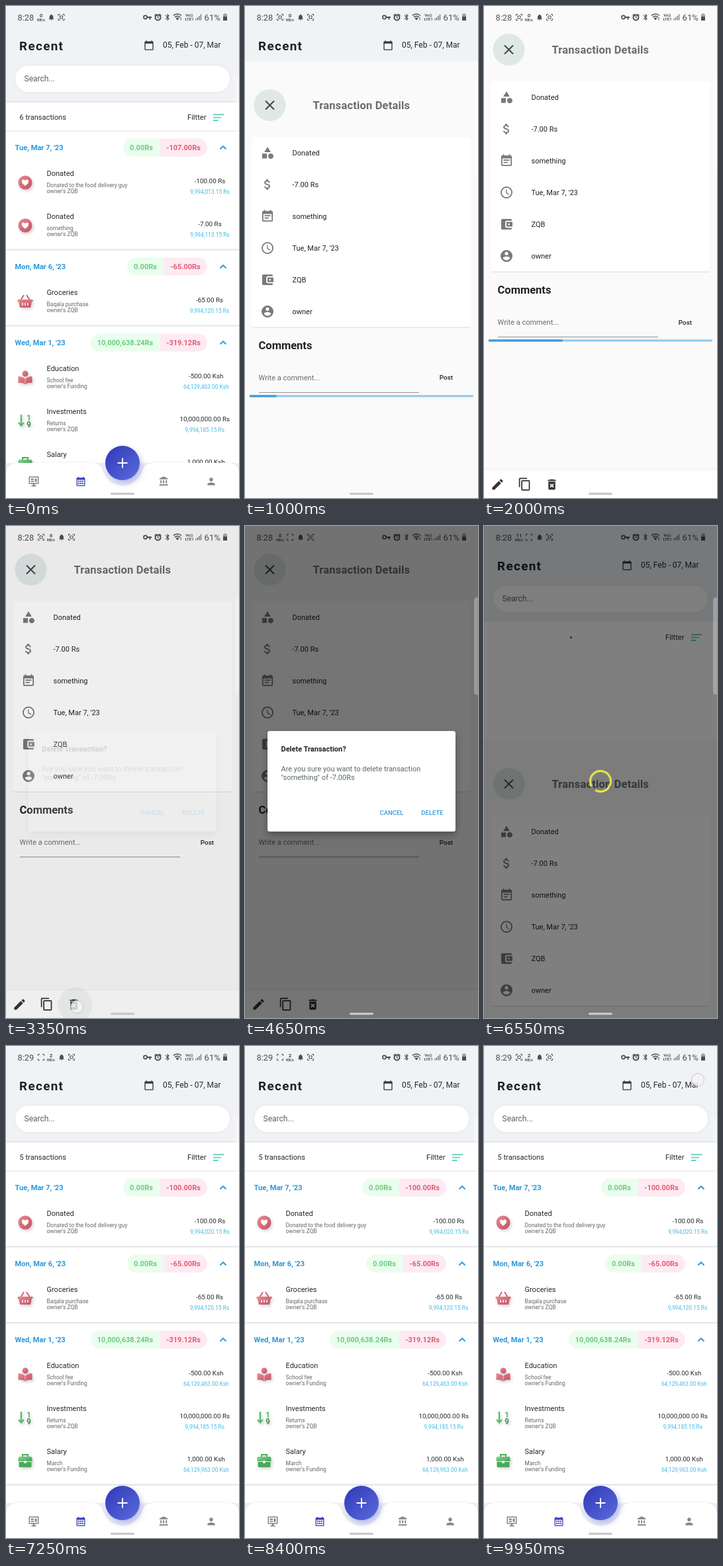
An HTML page that plays this animation: 352x744 px, repeating every 10 s.

```html
<!DOCTYPE html>
<html lang="en">
<head>
<meta charset="utf-8">
<title>Transactions</title>
<style>
html, body { margin: 0; width: 100%; height: 100%; overflow: hidden; background: #f0f2f5; }
svg { display: block; width: 100%; height: 100%; }
text { font-family: Roboto, Arial, sans-serif; white-space: pre; }
</style>
</head>
<body>
<svg id="stage" viewBox="0 0 352 744" xmlns="http://www.w3.org/2000/svg"></svg>
<script>
const LOOP = 10000;
const BLUE = '#2f97d6', INK = '#26282c', GREY = '#7a7a7a';

// Icon outlines on a 24 unit grid
const ICONS = {
  shapes: 'M12 2l-5.5 9h11zM3 13.5h8v8H3zM17.5 13a4.5 4.5 0 1 0 .01 0z',
  money: 'M11.8 10.9c-2.27-.59-3-1.2-3-2.15 0-1.09 1.01-1.85 2.7-1.85 1.78 0 2.44.85 2.5 2.1h2.21c-.07-1.72-1.12-3.3-3.21-3.81V3h-3v2.16c-1.94.42-3.5 1.68-3.5 3.61 0 2.31 1.91 3.46 4.7 4.13 2.5.6 3 1.48 3 2.41 0 .69-.49 1.79-2.7 1.79-2.06 0-2.87-.92-2.98-2.1h-2.2c.12 2.19 1.76 3.42 3.68 3.83V21h3v-2.15c1.95-.37 3.5-1.5 3.5-3.55 0-2.84-2.43-3.81-4.7-4.4z',
  note: 'M17 10H7v2h10zM19 3h-1V1h-2v2H8V1H6v2H5a2 2 0 0 0-2 2v14a2 2 0 0 0 2 2h14a2 2 0 0 0 2-2V5a2 2 0 0 0-2-2zm0 16H5V8h14zm-5-5H7v2h7z',
  clock: 'M12 2a10 10 0 1 0 .01 0zM12 20a8 8 0 1 1 .01 0zM12.5 7H11v6l5.25 3.15.75-1.23-4.5-2.67z',
  wallet: 'M21 18v1a2 2 0 0 1-2 2H5a2 2 0 0 1-2-2V5a2 2 0 0 1 2-2h14a2 2 0 0 1 2 2v1h-9a2 2 0 0 0-2 2v8a2 2 0 0 0 2 2zm-9-2h10V8H12zm4-2.5a1.5 1.5 0 1 1 .01 0z',
  account: 'M12 2a10 10 0 1 0 .01 0zM12 5a3 3 0 1 1-.01 0zM12 19.2c-2.5 0-4.71-1.28-6-3.22.03-1.99 4-3.08 6-3.08 1.99 0 5.97 1.09 6 3.08-1.29 1.94-3.5 3.22-6 3.22z',
  edit: 'M3 17.25V21h3.75L17.81 9.94l-3.75-3.75zM20.71 7.04a1 1 0 0 0 0-1.41l-2.34-2.34a1 1 0 0 0-1.41 0l-1.83 1.83 3.75 3.75z',
  copy: 'M16 1H4a2 2 0 0 0-2 2v14h2V3h12zM19 5H8a2 2 0 0 0-2 2v14a2 2 0 0 0 2 2h11a2 2 0 0 0 2-2V7a2 2 0 0 0-2-2zm0 16H8V7h11z',
  trash: 'M6 19a2 2 0 0 0 2 2h8a2 2 0 0 0 2-2V7H6zm2.46-7.12l1.41-1.41L12 12.59l2.12-2.12 1.41 1.41L13.41 14l2.12 2.12-1.41 1.41L12 15.41l-2.12 2.12-1.41-1.41L10.59 14zM15.5 4l-1-1h-5l-1 1H5v2h14V4z',
  bank: 'M4 10v7h3v-7zM10 10v7h3v-7zM2 22h19v-3H2zM16 10v7h3v-7zM11.5 1L2 6v2h19V6z',
  person: 'M12 4a4 4 0 1 0 .01 0zM12 14c-2.67 0-8 1.34-8 4v2h16v-2c0-2.66-5.33-4-8-4z',
  calendar: 'M20 3h-1V1h-2v2H7V1H5v2H4a2 2 0 0 0-2 2v16a2 2 0 0 0 2 2h16a2 2 0 0 0 2-2V5a2 2 0 0 0-2-2zm0 18H4V8h16z',
  month: 'M20 3h-1V1h-2v2H7V1H5v2H4a2 2 0 0 0-2 2v16a2 2 0 0 0 2 2h16a2 2 0 0 0 2-2V5a2 2 0 0 0-2-2zm0 18H4V8h16zM6 10h3v3H6zM10.5 10h3v3h-3zM15 10h3v3h-3zM6 15h3v3H6zM10.5 15h3v3h-3zM15 15h3v3h-3z',
  monitor: 'M2 2h20v15H2zM4 4v11h16V4zM6 6h6v3H6zM6 10.5h6V13H6zM14 6h4v7h-4zM10 17h4v3h3v2H7v-2h3z',
  bell: 'M12 22a2 2 0 0 0 2-2h-4a2 2 0 0 0 2 2zM18 16v-5c0-3.07-1.64-5.64-4.5-6.32V4a1.5 1.5 0 0 0-3 0v.68C7.63 5.36 6 7.92 6 11v5l-2 2v1h16v-1z',
  bluetooth: 'M17.71 7.71L12 2h-1v7.59L6.41 5 5 6.41 10.59 12 5 17.59 6.41 19 11 14.41V22h1l5.71-5.71-4.3-4.29zM13 5.83l1.88 1.88L13 9.59zM14.88 16.29L13 18.17v-3.76z',
  heart: 'M12 21C5 15 2 12 2 8a5 5 0 0 1 10-2 5 5 0 0 1 10 2c0 4-3 7-10 13z'
};

const attrs = o => Object.entries(o).map(([k, v]) => `${k}="${v}"`).join(' ');
const group = (body, o = {}) => `<g ${attrs(o)}>${body}</g>`;
const rect = (x, y, width, height, fill, o = {}) => `<rect ${attrs({ x, y, width, height, fill, ...o })}/>`;
const circle = (cx, cy, r, fill, o = {}) => `<circle ${attrs({ cx, cy, r, fill, ...o })}/>`;
const path = (d, fill, o = {}) => `<path ${attrs({ d, fill, ...o })}/>`;
const line = (d, stroke, w = 1, o = {}) => path(d, 'none', { stroke, 'stroke-width': w, ...o });
const icon = (name, cx, cy, size, fill) => path(ICONS[name], fill, {
  'fill-rule': 'evenodd', transform: `translate(${cx - size / 2} ${cy - size / 2}) scale(${size / 24})` });
// y is the middle of the capitals
const text = (x, y, str, size, fill = INK, weight = 400, o = {}) =>
  `<text ${attrs({ x, y: y + size * .355, 'font-size': size, fill, 'font-weight': weight, ...o })}>${str}</text>`;
const mid = (x, y, str, size, fill, weight, o = {}) => text(x, y, str, size, fill, weight, { 'text-anchor': 'middle', ...o });

const ART = {
  Donated: circle(0, 0, 10.5, 'url(#red)') + icon('heart', 0, .5, 12, '#fff'),
  Groceries: line('M-7 -2L-2 -10M7 -2L2 -10', '#c9606c', 1.8) +
    path('M-11.5 -3H11.5V0H10L8 9H-8L-10 0H-11.5Z', 'url(#red)') + line('M-4 2V6M0 2V6M4 2V6', '#fff', 1.4),
  Education: circle(0, -6, 4.5, 'url(#red)') +
    path('M-10.5 -2Q-4 -2 0 2Q4 -2 10.5 -2V8Q4 7 0 10Q-4 7 -10.5 8Z', 'url(#red)') + line('M0 2V9', '#f3bcc2', 1),
  Investments: line('M-6 -9V7M-10 3L-6 7.5L-2 3', '#58bd68', 2.4) +
    mid(5.5, -4.5, '1', 12, '#58bd68', 700) + mid(5.5, 5.5, '9', 12, '#468b50', 700),
  Salary: line('M-4 -6V-9H4V-6', '#4fae5e', 2) + rect(-10.5, -6, 21, 8, 'url(#green)', { rx: 2 }) +
    rect(-9.5, 1, 19, 9, '#4aa95a', { rx: 1.5 }) + line('M-10 1.5H10', '#e2f5e4', 1) + rect(-2, 0, 4, 4, '#e2f5e4', { rx: 1 })
};

function entry(top, [title, note, account, amount, balance, cx]) {
  return group(ART[title], { transform: `translate(29 ${top + 27})`, filter: 'url(#soft)' }) +
    text(61.5, top + 13, title, 11) +
    text(61.5, top + 31, note, 8.5, '#65686d') + text(61.5, top + 40, account, 8.5, '#65686d') +
    mid(cx, top + 24, amount, 9.9, INK) + mid(cx, top + 41.5, balance, 8.4, '#45bce8');
}

function section(top, { day, income, spent, left, split, rows }) {
  const mark = top + 24, end = top + 50 + rows.length * 65;
  return path(`M${split} ${mark - 13.5}H${left + 13.5}a13.5 13.5 0 0 0 0 27H${split}Z`, '#eafdee') +
    path(`M${split} ${mark - 13.5}H290.5a13.5 13.5 0 0 1 0 27H${split}Z`, '#feeaf2') +
    text(13.5, mark, day, 11.1, BLUE, 700) +
    mid((left + split) / 2 - .5, mark, income, 11, '#69cd7c', 700) +
    mid((split + 304) / 2 - .5, mark, spent, 11, '#e35d72', 700) +
    line(`M323.5 ${mark + 2.5}L328 ${mark - 2}L332.5 ${mark + 2.5}`, BLUE, 1.9) +
    rows.map((r, i) => entry(top + 50 + i * 65, r)).join('') +
    rect(0, end - 2.5, 352, 2, '#e2e4e8');
}

const BANK = "owner's ZQB", FUND = "owner's Funding";
const later = [
  { day: "Mon, Mar 6, '23", income: '0.00Rs', spent: '-65.00Rs', left: 183, split: 239, rows: [
    ['Groceries', 'Baqala purchase', BANK, '-65.00 Rs', '9,994,120.15 Rs', 307.5]] },
  { day: "Wed, Mar 1, '23", income: '10,000,638.24Rs', spent: '-319.12Rs', left: 128, split: 233, rows: [
    ['Education', 'School fee', FUND, '-500.00 Ksh', '64,129,463.00 Ksh', 302.3],
    ['Investments', 'Returns', BANK, '10,000,000.00 Rs', '9,994,185.15 Rs', 300.3],
    ['Salary', 'March', FUND, '1,000.00 Ksh', '64,129,963.00 Ksh', 302.3]] }
];
const today = (spent, rows) => ({ day: "Tue, Mar 7, '23", income: '0.00Rs', spent, left: 177, split: 233, rows });
const gift = balance => ['Donated', 'Donated to the food delivery guy', BANK, '-100.00 Rs', balance, 308];

function list(id, count, sections) {
  let top = 190;
  let body = text(20.5, 168.5, `${count} transactions`, 11.1) +
    rect(0, 144, 352, 2, '#e5e7eb') + rect(0, 188.5, 352, 1.2, '#e4e6e9');
  for (const s of sections) {
    body += section(top, s);
    top += 50 + s.rows.length * 65;
  }
  return group(body, { id });
}

const home = rect(0, 0, 352, 744, '#fff') + rect(0, 0, 352, 145, '#f0f2f5') +
  text(20, 60, 'Recent', 18.8, '#1d2024', 700, { 'letter-spacing': 1.4 }) +
  icon('calendar', 216, 59.5, 16, '#34363a') + text(237, 59, '05, Feb - 07, Mar', 12, INK) +
  rect(14, 90, 324, 40, '#fff', { rx: 20, filter: 'url(#faint)' }) + text(27.5, 110, 'Search...', 12, '#5f6165') +
  text(274, 168.5, 'Filtter', 11.1) +
  line('M313 164.2H329.5M313 168.6H325M313 173H320.5', '#68cfbc', 1.9) +
  list('before', 6, [today('-107.00Rs', [gift('9,994,013.15 Rs'),
    ['Donated', 'something', BANK, '-7.00 Rs', '9,994,113.15 Rs', 308]]), ...later]) +
  list('after', 5, [today('-100.00Rs', [gift('9,994,020.15 Rs')]), ...later]) +
  circle(131.5, 168.5, 1.8, '#6b7b8c', { id: 'dot' }) +
  rect(0, 691, 352, 53, '#f0f1f5') +
  path('M0 744V709Q0 691 18 691H128Q143 691 146 702A31 31 0 0 0 206 702Q209 691 224 691H334Q352 691 352 709V744Z', '#fff', { filter: 'url(#faint)' }) +
  circle(176, 691, 26, 'url(#fab)', { filter: 'url(#glow)' }) + line('M168.5 691H183.5M176 683.5V698.5', '#fff', 2) +
  icon('monitor', 42, 719, 18, '#85878c') + icon('month', 113, 719, 15.5, '#3440b8') +
  icon('bank', 238.5, 718.5, 16, '#85878c') + icon('person', 310, 719, 17, '#85878c');

const facts = [['shapes', 'Donated'], ['money', '-7.00 Rs'], ['note', 'something'],
  ['clock', "Tue, Mar 7, '23"], ['wallet', 'ZQB'], ['account', 'owner']];

const sheet = rect(0, 0, 352, 744, '#fafafa') +
  circle(37.5, 66, 24, '#dfe8e6') + line('M31 59.5L44 72.5M44 59.5L31 72.5', '#444', 2) +
  text(102.5, 66, 'Transaction Details', 16.5, '#6c6c6c', 700, { 'letter-spacing': .17 }) +
  rect(11, 114, 330, 287.5, '#fff', { rx: 3, filter: 'url(#card)' }) +
  facts.map(([name, label], i) => icon(name, 34, 138 + 48 * i, 21.5, GREY) +
    text(71.5, 138 + 48 * i, label, 11, '#222')).join('') +
  text(20.5, 429, 'Comments', 16.5, '#202226', 700) +
  text(20.5, 478, 'Write a comment...', 11, '#6a6a6a') + line('M21 500.5H263', '#929292', 1) +
  mid(304, 478, 'Post', 9.9, '#222', 500) +
  group(rect(7, 504.3, 338, 3.2, '#94caf2') + rect(7, 504.3, 0, 3.2, '#4799d8', { id: 'run1' }) +
    rect(7, 504.3, 0, 3.2, '#4799d8', { id: 'run2' }), { id: 'bar' }) +
  rect(0, 702, 352, 42, '#fff', { filter: 'url(#faint)' }) +
  circle(104.5, 724, 26, '#244', { id: 'ripple' }) +
  icon('edit', 20.5, 723.5, 21.5, '#333') + icon('copy', 61.5, 723, 21, '#333') + icon('trash', 102.5, 723.5, 21, '#333');

const dialog = rect(34, 310, 284, 152, '#fff', { rx: 3.5, filter: 'url(#lift)' }) +
  text(54.5, 337, 'Delete Transaction?', 11, '#222', 700) +
  text(54.5, 367.5, 'Are you sure you want to delete transaction', 11, '#5d6667') +
  text(54.5, 380, '"something" of -7.00Rs', 11, '#5d6667') +
  mid(221.5, 434, 'CANCEL', 9.5, '#3c98d8', 500) + mid(283, 434, 'DELETE', 9.5, '#3c98d8', 500);

const BAR = '#000';
const capture = id => group(line('M-4.5 -2V-4.5H-2M2 -4.5H4.5V-2M4.5 2V4.5H2M-2 4.5H-4.5V2', BAR, 1) +
  rect(-2, -2, 4, 4, 'none', { stroke: BAR, class: 'core' }), { id });

// Drawn in black and thinned as a whole, so it darkens over a dimmed page
const status = group(text(17.5, 17, '8:28', 12.8, BAR, 400, { id: 'time' }) +
  capture('cap1') + capture('cap2') +
  group(mid(0, -3, '0', 8, BAR, 700, { id: 'rate' }) + mid(0, 4.5, 'KB/s', 5.5, BAR, 700), { id: 'speed' }) +
  group(icon('bell', 0, 0, 11.5, BAR), { id: 'bell' }) +
  circle(210.5, 17, 2.6, 'none', { stroke: BAR, 'stroke-width': 1.6 }) + line('M213 17H220M217.5 17V20.5', BAR, 2) +
  circle(229.5, 17.5, 4, 'none', { stroke: BAR, 'stroke-width': 2 }) +
  line('M229.5 15V17.5L231 18.5M224.5 14.5L227.5 12M231.5 12L234.5 14.5', BAR, 1.3) +
  icon('bluetooth', 244, 17, 12, BAR) +
  line('M253 14.5Q259 9.5 265 14.5M255 17Q259 13.5 263 17', BAR, 1.4) + path('M256.5 18.5Q259 16.5 261.5 18.5L259 21.5Z', BAR) +
  line('M264 17V21.5', BAR, 1) +
  mid(277, 14, 'Vo))', 6, BAR, 700) + mid(277, 20, 'LTE1', 6, BAR, 700) +
  line('M287 21.5V19M289.5 21.5V17M292 21.5V15M294.5 21.5V12.5', BAR, 1.4, { opacity: .75 }) +
  text(299.5, 17, '61%', 13.2, BAR) +
  path('M328 12.5H329.5V11.3H332.5V12.5H334V16H328Z', BAR, { opacity: .5 }) + rect(328, 16, 6, 6, BAR), { opacity: .68 });

const grad = (id, a, b) => `<linearGradient id="${id}" x2="1" y2="1"><stop stop-color="${a}"/><stop offset="1" stop-color="${b}"/></linearGradient>`;
const shadow = (id, dx, dy, blur, color, alpha) => `<filter id="${id}" x="-50%" y="-50%" width="200%" height="200%">` +
  `<feDropShadow dx="${dx}" dy="${dy}" stdDeviation="${blur}" flood-color="${color}" flood-opacity="${alpha}"/></filter>`;

const stage = document.getElementById('stage');
stage.innerHTML = '<defs>' + grad('red', '#e78b94', '#c2505f') + grad('green', '#86d792', '#3f9c50') + grad('fab', '#3038b8', '#5c6cdc') +
  shadow('soft', 2, 2.5, 2, '#667', .28) + shadow('faint', 0, 0, 2, '#778', .13) + shadow('card', 0, 1, .5, '#000', .17) +
  shadow('glow', 3, 5, 4, '#5a68d8', .4) + shadow('lift', 0, 5, 6, '#000', .3) + '</defs>' +
  home + group(sheet, { id: 'sheet' }) + rect(0, 0, 352, 744, '#000', { id: 'dim' }) +
  group(dialog, { id: 'dialog' }) +
  group(rect(0, 0, 352, 744, '#000', { opacity: .5 }) +
    circle(176, 386, 15.5, 'none', { id: 'ring', stroke: '#e6e04a', 'stroke-width': 3.2, pathLength: 100, 'stroke-dasharray': '92 8' }), { id: 'loader' }) +
  status + circle(0, 0, 9.5, '#f4f4f6', { id: 'touch', stroke: '#b8babe', 'stroke-width': 1 }) +
  path('M352 108H350Q346 108 346 113V250Q346 255 350 255H352Z', '#fff', { opacity: .28 }) +
  rect(158, 736, 36, 3.2, '#c8c8ca', { rx: 1.6 });

const el = {};
stage.querySelectorAll('[id]').forEach(n => el[n.id] = n);
const core = stage.querySelector('.core');

const set = (n, k, v) => n.setAttribute(k, v);
const show = (n, on) => set(n, 'display', on ? 'inline' : 'none');
const fade = (n, v) => { show(n, v > 0); set(n, 'opacity', v); };
const span = (t, start, length) => Math.min(1, Math.max(0, (t - start) / length));
const pulse = (t, a, b, edge) => Math.min(span(t, a, edge), 1 - span(t, b - edge, edge));
const place = (n, x) => set(n, 'transform', `translate(${x} 17)`);

function bezier(x1, y1, x2, y2, x) {
  const at = (a, b, s) => 3 * a * s * (1 - s) ** 2 + 3 * b * s * s * (1 - s) + s ** 3;
  let lo = 0, hi = 1;
  for (let i = 0; i < 20; i++) {
    const m = (lo + hi) / 2;
    if (at(x1, x2, m) < x) lo = m; else hi = m;
  }
  return at(y1, y2, lo);
}

// Status icons: start, rate, leading icon order, full capture icon
const STATUS = [[0, '0', '', 1], [300, '0', 'CS', 1], [3000, '6', 'CS', 1], [3700, '0', 'SC', 0],
  [5500, '11', 'SC', 0], [7200, '2', 'CS', 0], [9000, '2', 'CS', 1]];
// Touches: start, end, x, y
const TOUCHES = [[640, 960, 176, 325], [3150, 3450, 107, 727], [5080, 5340, 284, 434], [9850, 10100, 323, 51]];

function drawStatus(t) {
  const [, rate, order, full] = STATUS.filter(s => s[0] <= t).pop();
  const shift = order ? 15.5 : 0;
  el.rate.textContent = rate;
  el.time.textContent = t < 7200 ? '8:28' : '8:29';
  show(el.cap1, order);
  place(el.cap1, order === 'SC' ? 68 : 53);
  place(el.speed, order === 'CS' ? 68 : 53);
  place(el.bell, 68.5 + shift);
  place(el.cap2, 83.5 + shift);
  show(core, full);
}

function drawBar(t) {
  const ms = (t - 868) % 1800;
  const run = (n, tail, head) => { set(n, 'x', 7 + 338 * tail); set(n, 'width', 338 * Math.max(0, head - tail)); };
  show(el.bar, t < 2250);
  if (ms < 0) return;
  run(el.run1, bezier(.4, 0, 1, 1, span(ms, 333, 750)), bezier(.2, 0, .8, 1, span(ms, 0, 750)));
  run(el.run2, bezier(.1, 0, .45, 1, span(ms, 1267, 533)), bezier(0, 0, .65, 1, span(ms, 1000, 567)));
}

function draw(t) {
  drawStatus(t);
  drawBar(t);
  const rise = (1 - span(t, 835, 250)) ** 2, fall = span(t, 6386, 250) ** 2;
  set(el.sheet, 'transform', `translate(0 ${744 * Math.max(rise, fall)})`);
  show(el.sheet, t > 835 && t < 6636);
  show(el.before, t < 6300);
  show(el.dot, t >= 6300 && t < 6950);
  show(el.after, t >= 6950);

  const open = pulse(t, 3330, 5450, 150);
  fade(el.dim, .54 * open ** 1.1);
  fade(el.dialog, open);
  fade(el.ripple, .06 * pulse(t, 3180, 3650, 120));
  fade(el.loader, pulse(t, 5350, 7200, 200));
  set(el.ring, 'transform', `rotate(${149 + (t - 6550) * .3} 176 386)`);

  const touch = TOUCHES.find(([a, b]) => t >= a && t < b);
  fade(el.touch, touch ? .8 * pulse(t, touch[0], touch[1], 60) : 0);
  if (touch) set(el.touch, 'transform', `translate(${touch[2]} ${touch[3]})`);
}

const began = performance.now();
function tick() {
  draw((performance.now() - began) % LOOP);
  requestAnimationFrame(tick);
}
tick();
</script>
</body>
</html>
```
